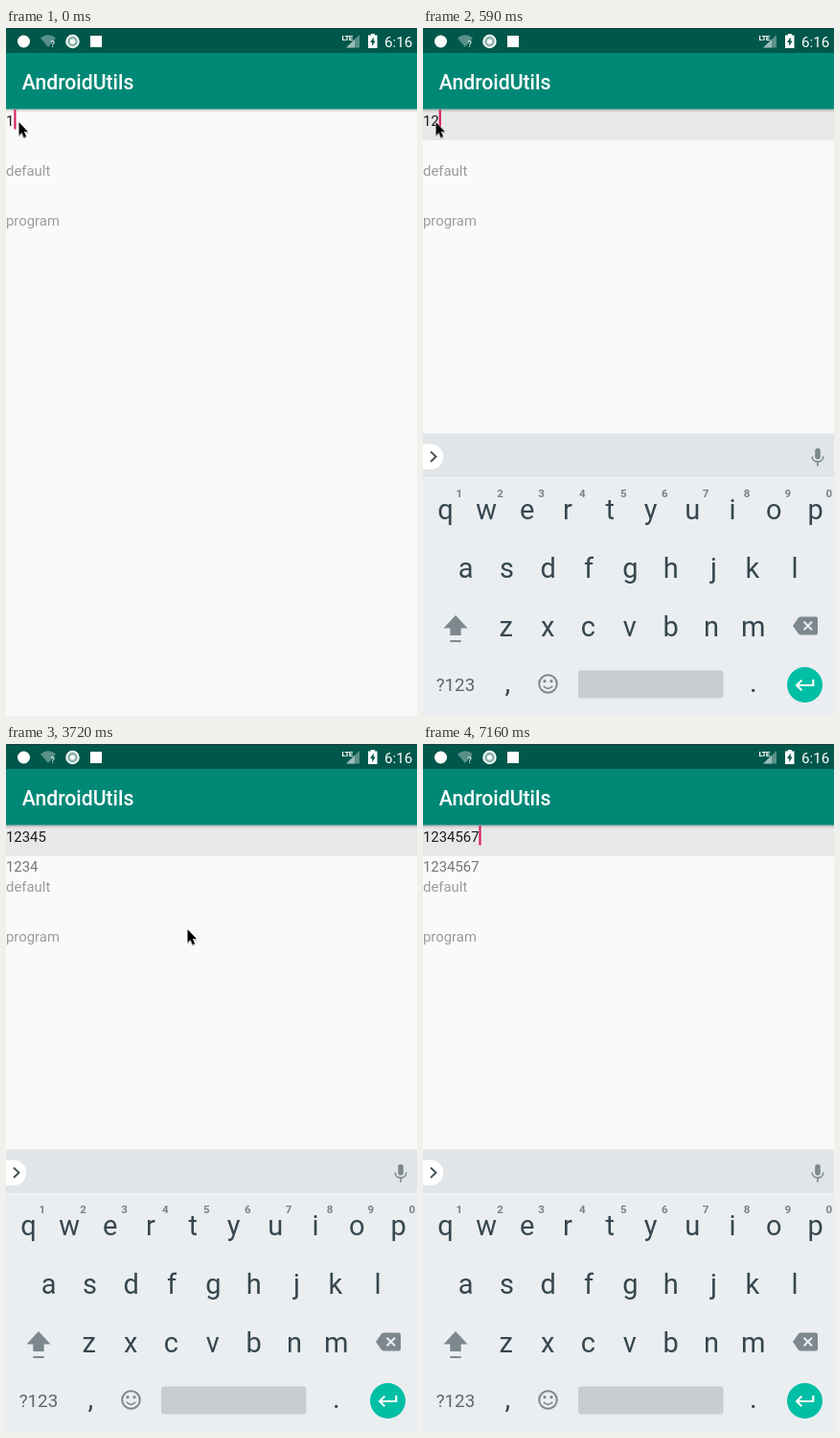
An HTML page for the animation above (7.26 s loop, 429 by 717 pixels).

```html
<!DOCTYPE html>
<html lang="en">
<head>
<meta charset="utf-8">
<title>AndroidUtils</title>
<style>
  html, body { margin: 0; width: 100%; height: 100%; overflow: hidden; background: #fafafa; }
  svg { display: block; width: 429px; height: 717px; font-family: Roboto, sans-serif; }
  .field { font-size: 14.9px; }
  .hint { fill: #9c9c9c; }
  .key { font-size: 29px; fill: #37474f; text-anchor: middle; }
  .digit { font-size: 11.5px; font-weight: 700; fill: #788286; text-anchor: middle; }
  .icon { fill: #7c888d; }
  .line { fill: none; stroke: #7c888d; stroke-width: 2; }
</style>
</head>
<body>
<svg viewBox="0 0 429 717">
  <defs>
    <linearGradient id="shade" x2="0" y2="1">
      <stop offset="0" stop-opacity=".3"/>
      <stop offset=".4" stop-opacity=".1"/>
      <stop offset="1" stop-opacity="0"/>
    </linearGradient>
  </defs>
  <rect width="429" height="717" fill="#fafafa"/>
  <rect id="press" y="84" width="429" height="33" fill="#e8e8e8"/>
  <rect y="84.5" width="429" height="4" fill="url(#shade)"/>

  <g class="field">
    <text id="input" y="102" fill="#1c1c1c"></text>
    <text id="echo" y="133" fill="#757575"></text>
    <text class="hint" y="153.5">default</text>
    <text class="hint" y="206">program</text>
  </g>
  <rect id="caret" y="85" width="2.1" height="20.5" fill="#d81b60"/>

  <rect width="429" height="26" fill="#00574b"/>
  <rect width="429" height="1" fill="#1f3b37"/>
  <rect y="26" width="429" height="58.5" fill="#008876"/>
  <text x="16.8" y="64" font-size="21.2" font-weight="500" fill="#fff">AndroidUtils</text>

  <!-- status bar -->
  <g fill="#fff">
    <circle cx="18.5" cy="14" r="6.5"/>
    <path d="M36 10.5Q44 4 52 10.5L44 20Z" opacity=".35"/>
    <text x="46.5" y="20" font-size="9" font-weight="700" opacity=".8">?</text>
    <circle cx="69.5" cy="14" r="6.3" fill="#8fb5af" stroke="#fff" stroke-width="1.8"/>
    <circle cx="69.5" cy="14" r="2.6"/>
    <rect x="88" y="8" width="12" height="12"/>
    <path d="M355 20.5H369V7Z" opacity=".35"/>
    <path d="M355 20.5H364V11.8Z" opacity=".4"/>
    <text x="350.5" y="13" font-size="8" font-weight="700" letter-spacing="-.6">LTE</text>
    <path d="M380.8 7.5V6H384.8V7.5H387.5V21H378V7.5Z"/>
    <path d="M383.7 9.5L380 15H382.2V19L385.6 13.4H383.7Z" fill="#00574b"/>
    <text x="395" y="19.5" font-size="15.2">6:16</text>
  </g>

  <g id="board">
    <rect y="422" width="429" height="1.5" fill="#eceef0"/>
    <rect y="423" width="429" height="46" fill="#e1e5e8"/>
    <rect y="468" width="429" height="300" fill="#eaeef1"/>
    <rect y="468" width="429" height="1.5" fill="#f1f4f6"/>
    <path d="M0 433.5H8A13.2 13.2 0 0 1 8 460H0Z" fill="#fff"/>
    <path d="M8 441.5L13.5 446.7 8 452" fill="none" stroke="#455157" stroke-width="1.9"/>

    <rect class="icon" x="409.2" y="438" width="5.6" height="11.5" rx="2.8"/>
    <path class="line" d="M406.2 446.5C406.2 454 417.8 454 417.8 446.5M412 452.5V456.8" style="stroke-width:1.6"/>

    <path class="icon" d="M34 612L46.5 625.5H39.7V633H28.3V625.5H21.5Z"/>
    <rect class="icon" x="28.3" y="638" width="11.4" height="2"/>
    <path class="icon" d="M386 623L392 614.5Q393 613.5 394.5 613.5H410Q412 613.5 412 615.5V630.5Q412 632.5 410 632.5H394.5Q393 632.5 392 631.5Z"/>
    <path d="M397.5 618.7L406 627.3M406 618.7L397.5 627.3" stroke="#eaeef1" stroke-width="2"/>

    <text x="13.7" y="690.5" font-size="18.8" fill="#5a686f">?123</text>
    <circle class="line" cx="130.5" cy="683.5" r="9.3"/>
    <g class="icon">
      <circle cx="127" cy="680.7" r="1.6"/>
      <circle cx="134" cy="680.7" r="1.6"/>
      <path class="line" d="M125.8 685.8Q130.5 691 135.2 685.8" style="stroke-width:1.7"/>
    </g>
    <rect x="162" y="669.5" width="151.5" height="29" rx="3" fill="#c9cdd0"/>
    <g id="enter">
      <circle cx="398.5" cy="684.5" r="18.5" fill="#00bfa5"/>
      <path d="M407.3 679V685H390.5M395.3 679.7L390 685 395.3 690.3" fill="none" stroke="#fff" stroke-width="2.1"/>
    </g>
  </g>

  <path id="mouse" d="M0 0V13.4L3 10.6 5.2 15.6 7.6 14.6 5.4 9.7H9.4Z" fill="#000" stroke="#fff" stroke-width="1" paint-order="stroke" style="filter:drop-shadow(.5px 1px .7px #0006)"/>
</svg>
<script>
  const LOOP = 7260, STEP = 150, PITCH = 42.9, DIGIT = 8.35;
  const $ = id => document.getElementById(id);
  const [press, input, echo, caret, board, enter, mouse] =
    ['press', 'input', 'echo', 'caret', 'board', 'enter', 'mouse'].map($);

  const pen = document.createElement('canvas').getContext('2d');
  pen.font = '29px Roboto, sans-serif';
  pen.textAlign = 'center';

  // How far a letter's ink sits to the right of its advance centre.
  function inkShift(c) {
    const m = pen.measureText(c);
    return (m.actualBoundingBoxRight - m.actualBoundingBoxLeft) / 2;
  }

  function label(cls, x, y, str) {
    const el = document.createElementNS('http://www.w3.org/2000/svg', 'text');
    el.setAttribute('class', cls);
    el.setAttribute('x', cls === 'key' ? x - inkShift(str) : x);
    el.setAttribute('y', y);
    el.textContent = str;
    board.append(el);
  }
  const row = (cls, x, y, chars) =>
    [...chars].forEach((c, i) => label(cls, x + i * PITCH, y, c));

  row('key', 23.3, 511.5, 'qwertyuiop');
  row('digit', 37.7, 488.5, '1234567890');
  row('key', 44.7, 573, 'asdfghjkl');
  row('key', 87, 633.5, 'zxcvbnm');
  label('key', 88, 692, ',');
  label('key', 345, 692, '.');

  // Each track lists [start, value]; a value holds until the next start.
  const typed = [[0, 1], [300, 2], [1040, 3], [1340, 4], [3280, 5], [4770, 6], [5070, 7]];
  const echoed = [[0, 0], [2380, 4], [4320, 5], [6110, 7]];
  const blink = [[0, 1], [1780, 0], [2380, 1], [2830, 0], [3280, 1], [3720, 0],
                 [4320, 1], [5510, 0], [6110, 1], [6560, 0], [7160, 1]];
  const pressed = [[0, 0], [150, .5], [300, 1]];
  const fade = [[0, 0], [300, .4], [450, .82], [590, 1]];
  const enterFade = [[0, .83], [590, 1]];
  const drop = [[0, 60], [300, 42], [450, 16.5], [590, 0]];
  const at = (track, t) => track.findLast(([start]) => t >= start)[1];

  // Pointer travel is sampled every STEP ms.
  function travel(t, start, steps) {
    const p = Math.min(Math.max(Math.floor((t - start) / STEP), 0), steps) / steps;
    return p * p * (3 - 2 * p);
  }

  function draw(t) {
    const count = at(typed, t);
    input.textContent = '1234567'.slice(0, count);
    echo.textContent = '1234567'.slice(0, at(echoed, t));
    caret.setAttribute('x', count * DIGIT);
    caret.setAttribute('opacity', at(blink, t));
    press.setAttribute('opacity', at(pressed, t));
    board.setAttribute('opacity', at(fade, t));
    enter.setAttribute('opacity', at(enterFade, t));
    board.setAttribute('transform', `translate(0 ${at(drop, t)})`);

    const a = travel(t, 2380, 5), b = travel(t, 5510, 6);
    mouse.setAttribute('transform', `translate(${13.5 + 176 * a + 179 * b} ${98.3 + 95 * a + 502 * b})`);
    mouse.setAttribute('opacity', t < 6560 ? 1 : 0);
  }

  const begin = performance.now();
  function tick() {
    draw((performance.now() - begin) % LOOP);
    requestAnimationFrame(tick);
  }
  tick();
</script>
</body>
</html>
```
